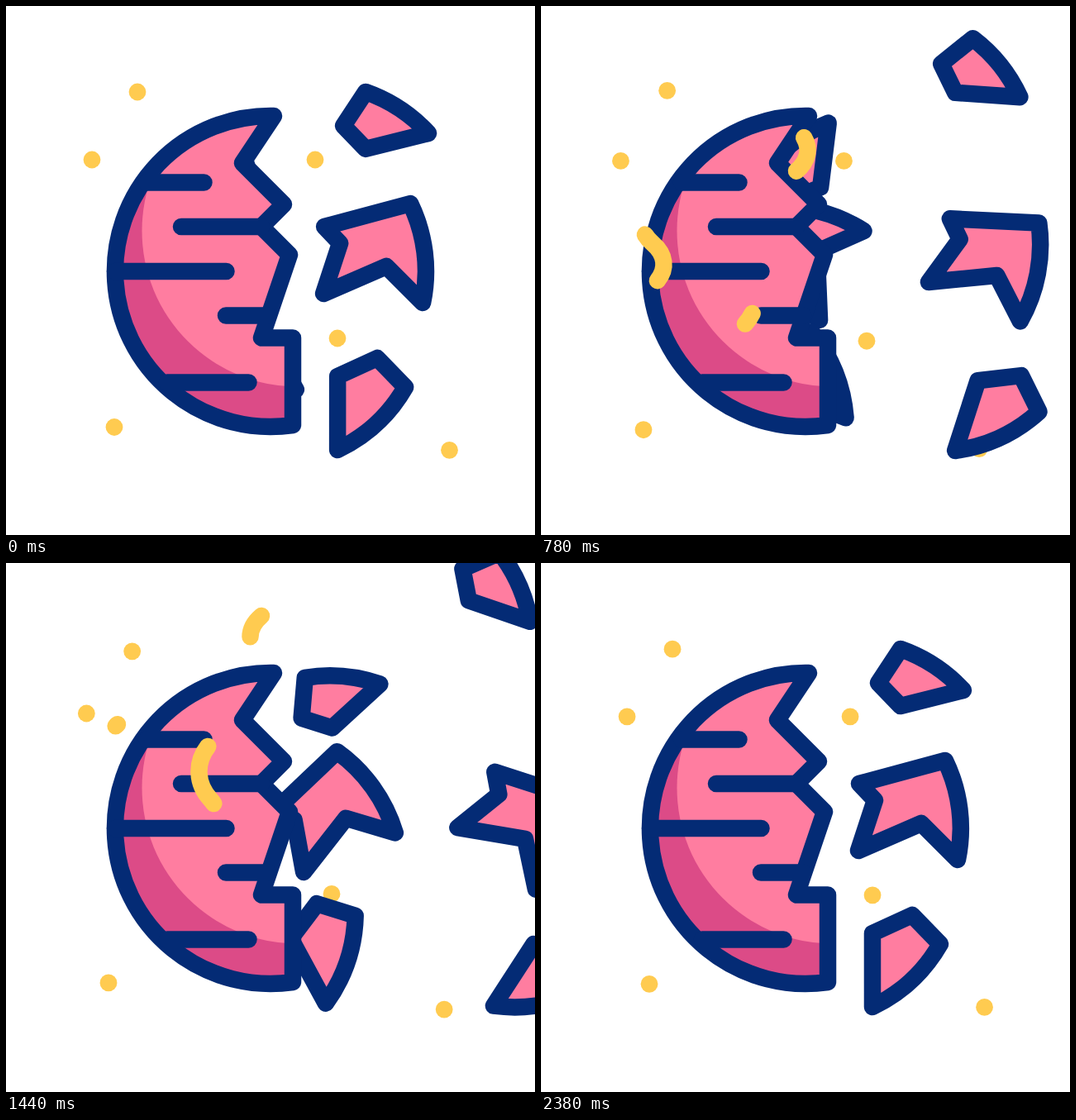
Animation of 640x640 px, one loop 2.4 s. Source, as an HTML page:

```html
<!DOCTYPE html>
<html lang="en">
<head>
<meta charset="utf-8">
<title>Broken planet</title>
<style>
  html, body { margin: 0; width: 100%; height: 100%; overflow: hidden; background: #fff; }
  svg { display: block; width: 100%; height: 100%; }
  .ink { stroke: #042b75; stroke-width: 20.5; stroke-linecap: round; stroke-linejoin: round; }
  .pink { fill: #ff7da0; }
  .trail { fill: none; stroke: #ffcb50; stroke-width: 20.5; stroke-linecap: round; }
  #dots { fill: #ffcb50; }
</style>
</head>
<body>
<svg viewBox="0 0 640 640">
  <defs>
    <path id="body" d="M324 133 286 190 336 240 309 267 343 301 309 401.5H347V507A188 188 0 1 1 324 133Z"/>
    <clipPath id="inside"><use href="#body"/></clipPath>
  </defs>
  <g id="dots"></g>
  <g id="pieces"></g>
  <use href="#body" fill="#dc4b87"/>
  <circle class="pink" cx="353" cy="272" r="188.5" clip-path="url(#inside)"/>
  <use href="#body" class="ink" fill="none"/>
  <path class="ink" d="M170 213.500H239.500M212 267H309M132 321H266.500M266 374.500H317M195 455.500H293.500"/>
  <g id="trails"></g>
</svg>
<script>
const LOOP = 2.4;
const EMERGE = 2.5; // the ease starts a little before the loop does, hidden by the planet

// home: resting centre, emerge: travel up to it, drift: travel after it
const pieces = [
  { d: 'M435 104A188 188 0 0 1 511 154L435 173 408 145Z',
    home: [459.5, 138], emerge: [196, -62], drift: [233, -181] },
  { d: 'M489 239A188 188 0 0 1 504 359L460 315 384 348 404 287 385 267Z',
    home: [446.5, 299], emerge: [179, -7], drift: [298, 23.5] },
  { d: 'M449 426 483 461A188 188 0 0 1 401 537V448Z',
    home: [442, 481.5], emerge: [149, 56], drift: [354, 50] }
];

// each sway: [x sine, x cosine, y sine, y cosine] amplitudes
const orbits = [
  { sway: [-0.9, -3.8, -2.9, 0.6], at: [[159, 104], [536.5, 537.3]] },
  { sway: [-1.6, -4.2, 3.4, -1.1], at: [[104, 186], [374, 186]] },
  { sway: [-1, -4.2, 3.3, 0.2], at: [[401, 402], [131, 509.5]] }
];

// y is the foot of the wave at time 0; head and tail are [start, duration]
const trails = [
  { x: 135, y: 386.5, speed: 62, half: 51, head: [0.34, 0.66], tail: [0.73, 0.73] },
  { x: 309, y: 239.5, speed: 51, half: 51, head: [0.44, 0.76], tail: [0.96, 0.64] },
  { x: 247, y: 422.5, speed: 48.5, half: 67, head: [0.66, 0.8], tail: [1.11, 0.73] }
];

const add = (parent, tag, attrs) => {
  const el = document.createElementNS('http://www.w3.org/2000/svg', tag);
  for (const key in attrs) el.setAttribute(key, attrs[key]);
  return document.getElementById(parent).appendChild(el);
};
const progress = (t, [start, time]) => Math.min(1, Math.max(0, (t - start) / time));

// cubic-bezier(.42, 0, .58, 1)
function easeInOut(x) {
  let s = x;
  for (let i = 0; i < 6; i++) {
    s -= (1.26 * s - 0.78 * s * s + 0.52 * s ** 3 - x) / (1.26 - 1.56 * s + 1.56 * s * s);
  }
  return s * s * (3 - 2 * s);
}

for (const p of pieces) {
  const make = () => add('pieces', 'path', { d: p.d, class: 'ink pink' });
  p.near = make();
  p.far = make();
}
for (const o of orbits) {
  o.els = o.at.map(([cx, cy]) => add('dots', 'circle', { cx, cy, r: 10.4 }));
}
for (const w of trails) {
  const a = w.half * 0.3, b = w.half * 0.7;
  w.el = add('trails', 'path', {
    class: 'trail', pathLength: 1,
    d: `M0 0c18 ${-a} 18 ${-b} 0 ${-w.half}c-18 ${-a} -18 ${-b} 0 ${-w.half}`
  });
}

function place(el, home, travel, amount, angle) {
  const [x, y] = travel.map(v => v * amount);
  el.setAttribute('transform', `translate(${x} ${y}) rotate(${angle} ${home})`);
}

function draw(t) {
  const left = easeInOut((LOOP - t) / EMERGE);
  const gone = t / LOOP;
  for (const p of pieces) {
    place(p.near, p.home, p.emerge, -left, -93 * left);
    place(p.far, p.home, p.drift, gone, 55 * gone);
  }

  const sin = Math.sin(2 * Math.PI * gone), cos = 1 - Math.cos(2 * Math.PI * gone);
  for (const { sway: [a, b, c, d], els } of orbits) {
    for (const el of els) {
      el.setAttribute('transform', `translate(${a * sin + b * cos} ${c * sin + d * cos})`);
    }
  }

  for (const w of trails) {
    const head = progress(t, w.head) ** 1.2;
    const tail = progress(t, w.tail);
    w.el.setAttribute('visibility', head > tail ? 'visible' : 'hidden');
    w.el.setAttribute('transform', `translate(${w.x} ${w.y - w.speed * t})`);
    w.el.setAttribute('stroke-dasharray', `${Math.max(head - tail, 0.001)} 3`);
    w.el.setAttribute('stroke-dashoffset', -tail);
  }
}

const begin = performance.now();
function tick() {
  draw((performance.now() - begin) / 1000 % LOOP);
  requestAnimationFrame(tick);
}
tick();
</script>
</body>
</html>
```
